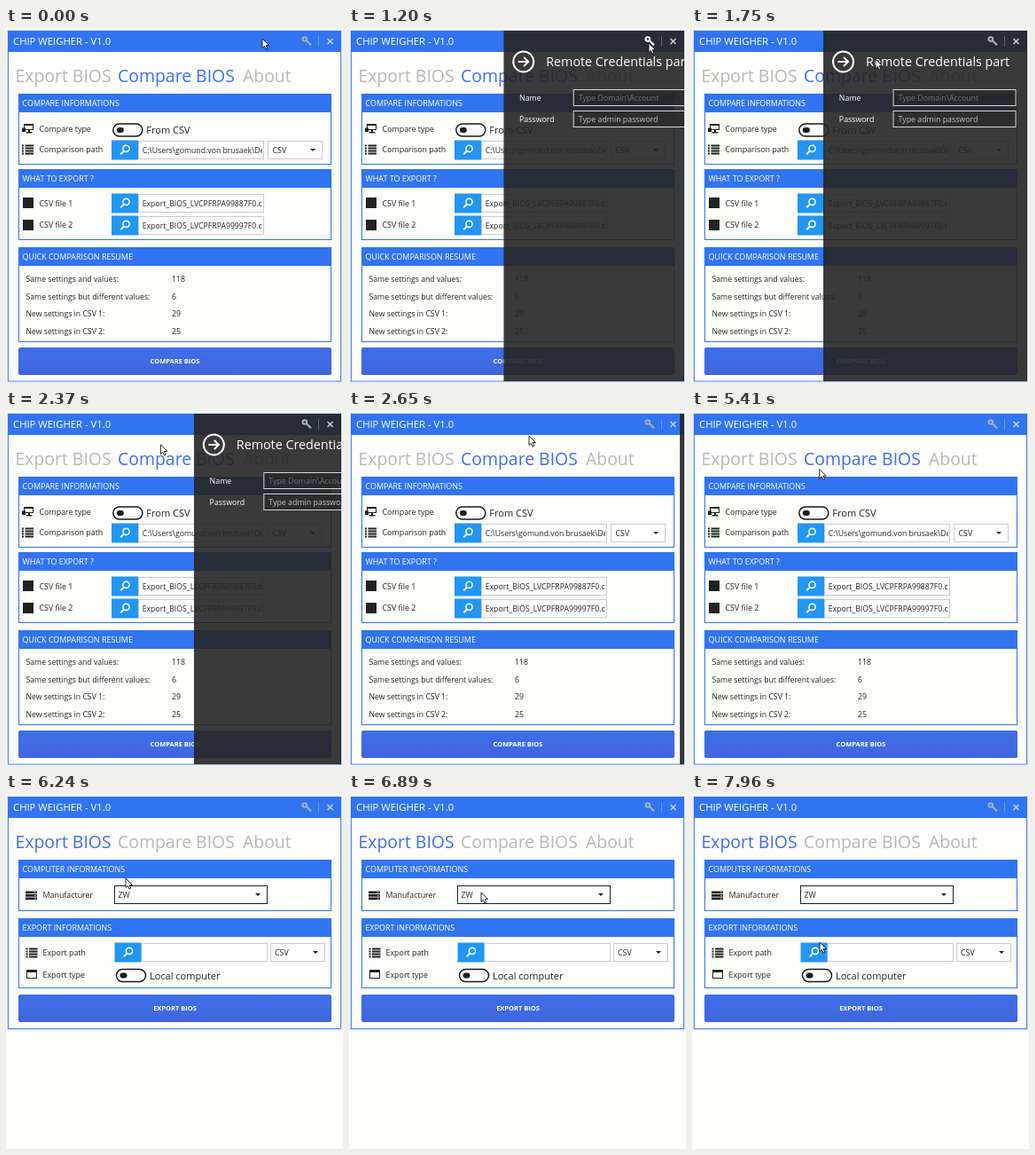
An HTML page with a canvas that plays this animation: 380x400 px, repeating every 8 s.

```html
<!DOCTYPE html>
<html lang="en">
<head>
<meta charset="utf-8">
<title>Chip settings tool</title>
<style>
html, body { margin: 0; width: 100%; height: 100%; overflow: hidden; background: #fefefc; }
canvas { display: block; width: 380px; height: 400px; }
</style>
</head>
<body>
<canvas id="stage"></canvas>
<script>
const LOOP = 8000;
const BLUE = '#3174f0', INK = '#222', PAPER = '#fefefc', LINE = '#c8ccd2';
const canvas = document.getElementById('stage');
const ctx = canvas.getContext('2d');
const dpr = window.devicePixelRatio || 1;
canvas.width = 380 * dpr;
canvas.height = 400 * dpr;

// Pointer stops: time, x, y
const stops = [
  [0, 289, 12], [270, 289, 12], [790, 338, 17], [1230, 338, 17],
  [1750, 207, 35], [1860, 203, 36], [2150, 174, 38], [2350, 174, 38],
  [2650, 203, 28], [2680, 203, 28], [3170, 262, 105], [3440, 262, 105],
  [3680, 310, 142], [4790, 310, 142], [5000, 171, 72], [5310, 171, 72],
  [5560, 95, 54], [6000, 95, 54], [6240, 135, 95], [6510, 149, 111],
  [7340, 149, 111], [7440, 156, 113], [7580, 156, 113], [7960, 144, 167],
  [8000, 144, 167]
];

function pointerAt(t) {
  const i = Math.max(1, stops.findIndex(s => s[0] > t));
  const [t0, x0, y0] = stops[i - 1], [t1, x1, y1] = stops[i];
  let u = (t - t0) / (t1 - t0);
  u = u * u * (3 - 2 * u);
  return [x0 + (x1 - x0) * u, y0 + (y1 - y0) * u];
}

function box(x, y, w, h, fill, stroke) {
  if (fill) {
    ctx.fillStyle = fill;
    ctx.fillRect(x, y, w, h);
  }
  if (stroke) {
    ctx.strokeStyle = stroke;
    ctx.lineWidth = 1;
    ctx.strokeRect(x + 0.5, y + 0.5, w - 1, h - 1);
  }
}

function text(str, x, y, size = 8.9, color = INK, weight = 400, align = 'left') {
  ctx.font = `${weight} ${size}px "Open Sans", "Noto Sans", sans-serif`;
  ctx.textAlign = align;
  ctx.fillStyle = color;
  ctx.fillText(str, x, y);
}

function path(points, color, width) {
  ctx.beginPath();
  points.forEach(([x, y]) => ctx.lineTo(x, y));
  ctx.strokeStyle = color;
  ctx.lineWidth = width;
  ctx.stroke();
}

function ring(x, y, r, color, width) {
  ctx.beginPath();
  ctx.arc(x, y, r, 0, 7);
  ctx.strokeStyle = color;
  ctx.lineWidth = width;
  ctx.stroke();
}

function pill(x, y, w, h, r, fill, stroke) {
  ctx.beginPath();
  ctx.roundRect(x, y, w, h, r);
  if (fill) { ctx.fillStyle = fill; ctx.fill(); }
  if (stroke) { ctx.strokeStyle = stroke; ctx.lineWidth = 1.5; ctx.stroke(); }
}

function group(title, top, bottom) {
  box(14, top, 353, bottom - top, PAPER, BLUE);
  box(14, top, 353, 21, BLUE);
  text(title, 18.5, top + 14, 8.95, '#fff');
}

function searchField(x, y, right, value) {
  box(x + 30, y, right - x - 30, 21, '#fff', LINE);
  box(x, y - 0.5, 30, 22, '#2196f3');
  ring(x + 16.5, y + 8.8, 3.6, '#fff', 1.5);
  path([[x + 14, y + 11.5], [x + 10.2, y + 15.3]], '#fff', 2);
  ctx.save();
  ctx.beginPath();
  ctx.rect(x + 31, y, right - x - 33, 21);
  ctx.clip();
  text(value, x + 34.7, y + 14, 8.7);
  ctx.restore();
}

function combo(x, y, w, value, textX, fill = '#fff', edge = LINE) {
  box(x, y, w, 21, fill, edge);
  text(value, textX, y + 14, 8.8);
  const ax = x + w - 11, ay = y + 9;
  ctx.beginPath();
  ctx.moveTo(ax - 3, ay);
  ctx.lineTo(ax + 3, ay);
  ctx.lineTo(ax, ay + 3);
  ctx.fillStyle = INK;
  ctx.fill();
}

function toggle(x, y, label) {
  pill(x, y, 33, 14, 7, '#fff', '#1a1a1a');
  pill(x + 4, y + 4, 8, 6, 3, '#1a1a1a');
  text(label, x + 37.5, y + 11.2, 11, INK);
}

function listIcon(x, y) {
  for (let i = 0; i < 4; i++) {
    box(x, y + i * 3, 2, 2, INK);
    box(x + 3.5, y + i * 3, 9.5, 2, INK);
  }
}

function monitorIcon() {
  box(20, 108, 11, 7, null, INK);
  box(20, 108, 11, 2, INK);
  box(25, 115, 2, 2.5, INK);
  box(22.5, 117, 7, 1.5, INK);
  box(18, 112.5, 4, 4.5, INK);
}

function serverIcon() {
  for (let i = 0; i < 3; i++) {
    box(22, 109.5 + i * 3.5, 13, 2.7, INK);
    box(32, 110.5 + i * 3.5, 1.5, 0.8, '#fff');
  }
}

function mainButton(label, y) {
  const g = ctx.createLinearGradient(0, y, 0, y + 31);
  g.addColorStop(0, '#3d6fe8');
  g.addColorStop(1, '#4066dc');
  pill(14, y, 353, 31, 2, g);
  text(label, 190.5, y + 18.3, 7.5, '#fff', 700, 'center');
}

function comparePage(t) {
  group('COMPARE INFORMATIONS', 74, 154);
  monitorIcon();
  text('Compare type', 37.5, 117);
  toggle(120.8, 108, 'From CSV');
  listIcon(18, 131.5);
  text('Comparison path', 37.5, 140);
  searchField(119, 127, 291, 'C:\\Users\\gomund.von brusaek\\Desktop');
  const hot = t >= 3600 && t < 4900;
  combo(295, 127, 62, 'CSV', 300.5, hot ? '#e9eaec' : '#fff', hot ? '#777' : LINE);

  group('WHAT TO EXPORT ?', 159, 239);
  ['99887', '99997'].forEach((id, i) => {
    const y = 187 + i * 24.5;
    box(19, Math.round(y + 4), 12, 12, INK);
    text('CSV file ' + (i + 1), 37.5, y + 13.8);
    searchField(119, Math.round(y), 291, `Export_BIOS_LVCPFRPA${id}F0.csv`);
  });

  group('QUICK COMPARISON RESUME', 247, 354);
  [['Same settings and values:', 118], ['Same settings but different values:', 6],
   ['New settings in CSV 1:', 29], ['New settings in CSV 2:', 25]].forEach(([label, n], i) => {
    const y = 286 + i * 19.7;
    text(label, 22.5, y, 8.7);
    text(n, 187, y, 8.7);
  });
  mainButton('COMPARE BIOS', 360);
}

function comboList(t) {
  if (t < 3870 || t >= 4620) return;
  const h = 36 * Math.min(1, 0.35 + (t - 3870) / 200);
  ctx.save();
  ctx.beginPath();
  ctx.rect(294, 148, 63, h);
  ctx.clip();
  box(295, 148, 61, 36, '#fff', '#9aa');
  box(296, 150, 58, 15, '#5298f2');
  text('CSV', 298, 160.5, 8.8, '#fff');
  text('HTML', 298, 177.5, 8.8);
  ctx.restore();
}

function exportPage() {
  group('COMPUTER INFORMATIONS', 74, 132);
  serverIcon();
  text('Manufacturer', 41.5, 117);
  combo(122, 103, 173, 'ZW', 126.5, '#fff', '#222');

  group('EXPORT INFORMATIONS', 140, 219);
  listIcon(22.5, 173.5);
  text('Export path', 41.5, 182);
  searchField(122.5, 168, 295, '');
  combo(298, 168, 62, 'CSV', 303);
  box(23, 198, 12, 10, null, INK);
  box(23, 198, 12, 3, INK);
  text('Export type', 41.5, 206.5);
  toggle(124.5, 197.5, 'Local computer');
  mainButton('EXPORT BIOS', 226);
}

function windowFrame(bottom, active) {
  box(0.5, 1.5, 379, bottom - 0.5, '#dfe7fb');
  box(2, 3, 376, bottom - 3, PAPER, '#4a80f0');
  box(2, 3, 376, 24, BLUE);
  text('CHIP WEIGHER - V1.0', 8, 19, 11.3, '#fff');
  [['Export BIOS', 10.5], ['Compare BIOS', 126], ['About', 267]].forEach(([label, x], i) =>
    text(label, x, 61, 19.4, i === active ? '#3f6ff0' : '#b8b8b8'));
}

function commands(t) {
  const lit = t > 680 && t < 1330;
  const c = lit ? '#fff' : '#a3b0c8';
  ring(336.8, 12.5, 2.3, c, 2);
  path([[338.5, 14], [344, 19.3]], c, 2);
  path([[341.5, 18.5], [343, 17]], c, 1.5);
  box(352, 9, 1, 12, 'rgba(255,255,255,.25)');
  path([[362.5, 12], [368.5, 18]], '#c6d1e8', 1.5);
  path([[368.5, 12], [362.5, 18]], '#c6d1e8', 1.5);
}

function panelLeft(t) {
  if (t < 1010 || t > 2900) return 378;
  if (t < 2345) return 148 + 230 * Math.exp(-(t - 1010) / 88);
  return 378 - 230 * Math.exp(-(t - 2345) / 80);
}

function panel(t) {
  const x = panelLeft(t);
  if (x > 377.5) return;
  ctx.save();
  ctx.beginPath();
  ctx.rect(x, 3, 378 - x, 395);
  ctx.clip();
  box(x, 3, 378 - x, 395, 'rgba(37,37,37,.9)');
  const cx = x + 22.5, cy = 38;
  ring(cx, cy, 11.5, '#fff', 2);
  path([[cx - 6, cy], [cx + 5, cy]], '#fff', 2);
  path([[cx + 0.5, cy - 5], [cx + 5.5, cy], [cx + 0.5, cy + 5]], '#fff', 2);
  text('Remote Credentials part', x + 48, 43.2, 14.3, '#fff');
  [['Name', 'Type Domain\\Account', '#727272'],
   ['Password', 'Type admin password', '#c4c4c4']].forEach(([label, hint, tone], i) => {
    const y = 69 + i * 24;
    text(label, x + 17.8, y + 13, 8.8, '#fff');
    box(x + 78.5, y, 139, 19, 'rgba(37,37,37,.6)', '#d8d8d8');
    text(hint, x + 84.5, y + 12.8, 8.8, tone);
  });
  ctx.restore();
}

function pointer(t) {
  const [x, y] = pointerAt(t);
  const shape = [[0, 0], [0, 10.5], [2.4, 8.4], [4, 12], [5.8, 11.2], [4.2, 7.7], [7.5, 7.5]];
  ctx.beginPath();
  shape.forEach(([dx, dy]) => ctx.lineTo(x + dx, y + dy));
  ctx.closePath();
  ctx.fillStyle = '#fff';
  ctx.fill();
  ctx.strokeStyle = '#111';
  ctx.lineWidth = 0.9;
  ctx.stroke();
}

function draw(t) {
  ctx.setTransform(dpr, 0, 0, dpr, 0, 0);
  box(0, 0, 380, 400, PAPER);
  const comparing = t < 5540;
  windowFrame(comparing ? 398.5 : 265, comparing ? 1 : 0);
  if (comparing) {
    comparePage(t);
    comboList(t);
    panel(t);
  } else {
    exportPage();
  }
  commands(t);
  pointer(t);
}

const start = performance.now();
function tick() {
  draw((performance.now() - start) % LOOP);
  requestAnimationFrame(tick);
}
tick();
</script>
</body>
</html>
```
